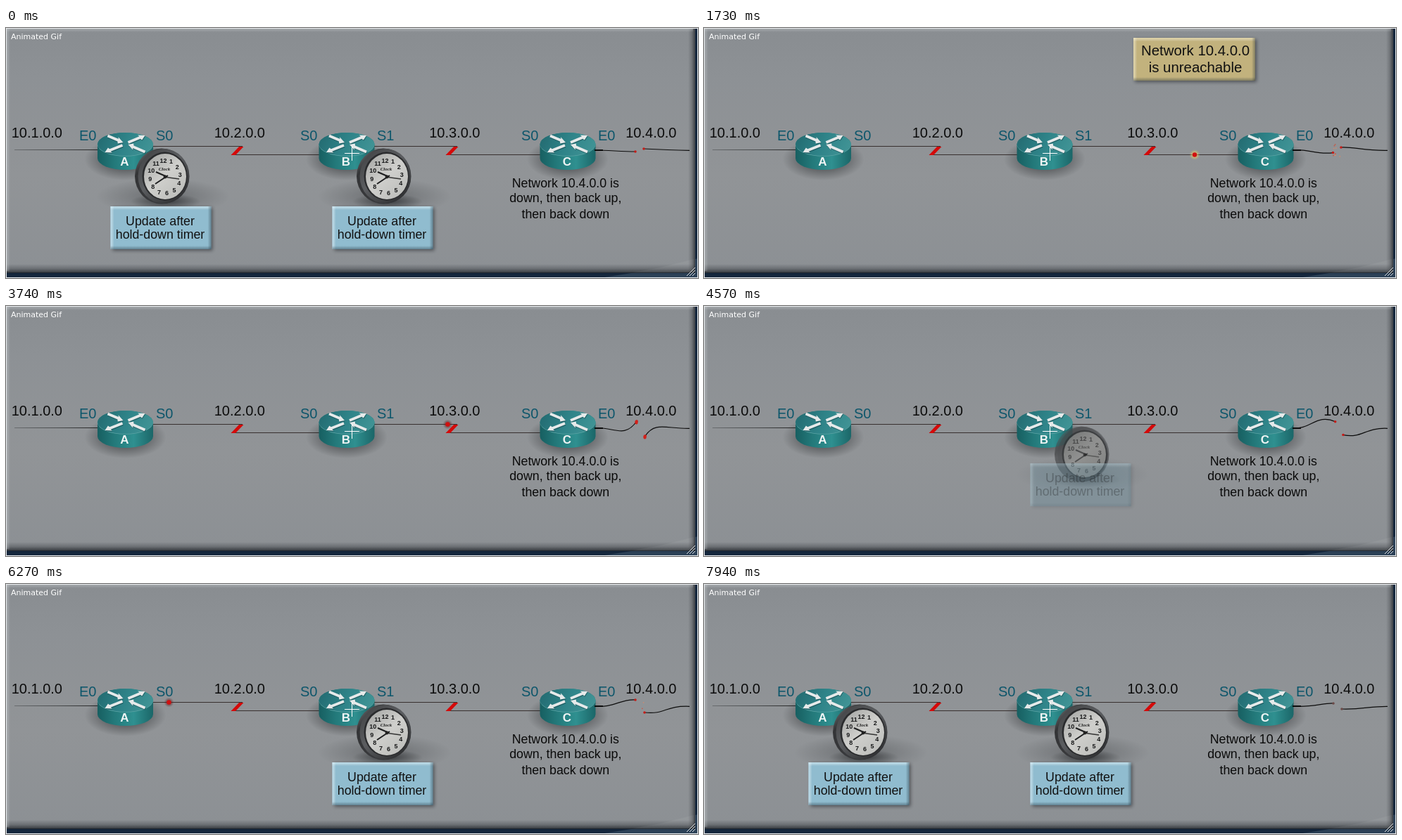
An HTML page with a canvas that plays this animation: 983 by 356 pixels, repeating every 8370 ms.

```html
<!DOCTYPE html>
<html lang="en">
<head>
<meta charset="utf-8">
<title>Hold-down timers</title>
<style>
html, body { margin: 0; width: 100%; height: 100%; overflow: hidden; background: #14253a; }
canvas { display: block; }
</style>
</head>
<body>
<canvas id="stage" width="983" height="356"></canvas>
<script>
const ctx = document.getElementById('stage').getContext('2d');
const W = 983, H = 356, LOOP = 8370;
const SANS = '"Liberation Sans", Arial, sans-serif';
const STEPS = [0, 70, 480, 890, 1310, 1730, 2150, 2540, 2940, 3350, 3740,
  4150, 4570, 5020, 5430, 5850, 6270, 6690, 7110, 7530, 7940];

// time, left wire (control, control, tip), right wire (tip, control, control)
const WIRES = [
  [0, 856, 174, 874, 176, 894, 176, 906, 172, 925, 173, 950, 174],
  [890, 856, 174, 874, 176, 894, 176, 906, 172, 925, 173, 950, 174],
  [2540, 856, 169, 870, 186, 893, 179, 904, 168, 921, 165, 928, 176],
  [3740, 862, 171, 878, 190, 896, 164, 908, 185, 922, 164, 938, 175],
  [5020, 862, 178, 868, 138, 897, 165, 908, 183, 941, 199, 938, 172],
  [6270, 862, 177, 875, 163, 894, 165, 907, 183, 938, 186, 935, 173],
  [7940, 865, 176, 880, 169, 894, 170, 906, 178, 935, 179, 945, 174],
  [LOOP, 856, 174, 874, 176, 894, 176, 906, 172, 925, 173, 950, 174]
];

const clamp = v => Math.max(0, Math.min(1, v));
const ramp = (t, from, to) => clamp((t - from) / (to - from));
const hash = n => { const s = Math.sin(n * 127.1 + 3.7) * 43758.5453; return s - Math.floor(s); };

function gradient(x0, y0, x1, y1, ...stops) {
  const g = ctx.createLinearGradient(x0, y0, x1, y1);
  stops.forEach(([p, c]) => g.addColorStop(p, c));
  return g;
}

function glow(x, y, r, inner, outer) {
  const g = ctx.createRadialGradient(x, y, 0, x, y, r);
  g.addColorStop(0, inner);
  g.addColorStop(1, outer);
  ctx.fillStyle = g;
  ctx.fillRect(x - r, y - r, 2 * r, 2 * r);
}

function shadow(x, y, rx, ry, alpha) {
  ctx.save();
  ctx.translate(x, y);
  ctx.scale(1, ry / rx);
  glow(0, 0, rx, `rgba(20,22,24,${alpha})`, 'rgba(20,22,24,0)');
  ctx.restore();
}

function text(str, x, y, size, color, align = 'left', style = '', family = SANS) {
  ctx.font = `${style} ${size}px ${family}`;
  ctx.textAlign = align;
  ctx.fillStyle = color;
  ctx.fillText(str, x, y);
}

function line(x0, y0, x1, y1, color, width = 1) {
  ctx.strokeStyle = color;
  ctx.lineWidth = width;
  ctx.beginPath();
  ctx.moveTo(x0, y0);
  ctx.lineTo(x1, y1);
  ctx.stroke();
}

function poly(points, color) {
  ctx.fillStyle = color;
  ctx.beginPath();
  points.forEach(([x, y]) => ctx.lineTo(x, y));
  ctx.closePath();
  ctx.fill();
}

function oval(x, y, rx, ry, fill) {
  ctx.fillStyle = fill;
  ctx.beginPath();
  ctx.ellipse(x, y, rx, ry, 0, 0, 7);
  ctx.fill();
}

function background() {
  ctx.fillStyle = '#14263c';
  ctx.fillRect(0, 0, W, H);
  poly([[850, 355], [920, 344], [983, 328], [983, 355]], '#2b4056');
  ctx.fillStyle = gradient(0, 0, 0, 348, [0, '#898d91'], [0.2, '#8d9195'], [0.6, '#919497'], [1, '#8c9094']);
  ctx.fillRect(0, 0, 979, 348);
  ctx.fillStyle = gradient(0, 336, 0, 349, [0, 'rgba(35,39,44,0)'], [0.5, 'rgba(35,39,44,.3)'], [1, 'rgba(35,39,44,.85)']);
  ctx.fillRect(0, 336, 979, 13);
  ctx.fillStyle = gradient(969, 0, 979, 0, [0, 'rgba(35,39,44,0)'], [0.5, 'rgba(35,39,44,.25)'], [1, 'rgba(35,39,44,.75)']);
  ctx.fillRect(969, 0, 10, 349);
  ctx.fillStyle = gradient(0, 0, 0, 6, [0, 'rgba(215,220,223,.4)'], [1, 'rgba(215,220,223,0)']);
  ctx.fillRect(0, 0, 976, 6);
  ctx.fillStyle = gradient(0, 0, 6, 0, [0, 'rgba(215,220,223,.4)'], [1, 'rgba(215,220,223,0)']);
  ctx.fillRect(0, 0, 6, 346);
  poly([[890, 348], [930, 341], [977, 329], [977, 348]], 'rgba(255,255,255,.05)');
  ctx.strokeStyle = '#e6e9eb';
  ctx.lineWidth = 1;
  ctx.strokeRect(0.5, 0.5, W - 1, H - 1);
  for (const d of [4, 8, 12]) line(979 - d, 353, 979, 353 - d, '#dfe3e6');
  text('Animated Gif', 7, 16, 11, '#fff', 'left', '', '"DejaVu Sans", Verdana, sans-serif');
}

function links() {
  const upper = 168.5, lower = 180.5, color = '#38302f';
  line(12, 173.5, 131, 173.5, gradient(12, 0, 131, 0, [0, 'rgba(50,52,54,.4)'], [0.5, '#4a4c4e'], [1, '#222']));
  for (const [x0, x1, zig] of [[207, 447, 0], [521, 761, 305]]) {
    line(x0, upper, 336 + zig, upper, color);
    line(320 + zig, lower, x1, lower, color);
    poly([[331 + zig, 169], [337.5 + zig, 169], [326 + zig, 181], [319.5 + zig, 181]], '#d40a0a');
  }
}

function arrow(x, y, dx, dy, color) {
  const len = Math.hypot(dx, dy), ux = dx / len, uy = dy / len;
  const at = (along, side) => [x + ux * along - uy * side, y + uy * along + ux * side];
  poly([at(0, -1.9), at(len - 8, -1.9), at(len - 9.5, -4.4), at(len, 0),
    at(len - 6.5, 4.4), at(len - 8, 1.9), at(0, 1.9)], color);
}

function router(x, name) {
  const top = 165.5, foot = 185.5, rx = 39.5, ry = 16.5;
  shadow(x, 187, 58, 30, 0.75);
  ctx.fillStyle = gradient(x - rx, 0, x + rx, 0, [0, '#175f61'], [0.3, '#23797a'], [0.65, '#2f9090'], [1, '#1b6668']);
  ctx.beginPath();
  ctx.ellipse(x, top, rx, ry, 0, Math.PI, 0);
  ctx.ellipse(x, foot, rx, ry, 0, 0, Math.PI);
  ctx.closePath();
  ctx.fill();
  oval(x, top + 0.8, rx, ry, '#5ba3a4');
  oval(x, top, rx, ry, gradient(x - 30, top - 14, x + 30, top + 14, [0, '#256f75'], [0.5, '#2f8489'], [1, '#3f9294']));
  for (const [ax, ay, dx, dy] of [[-25, -12, 22, 9.5], [4, -2.5, 24, -10], [-4, 1.5, -25, 10], [28, 11, -24, -10.5]]) {
    arrow(x + ax + 0.6, top + ay + 1.2, dx, dy, 'rgba(15,60,65,.5)');
    arrow(x + ax, top + ay, dx, dy, '#e6eaea');
  }
  text(name, x - 1, 196, 17, '#eef4f4', 'center', 'bold');
}

function bevelBox(x, y, w, h, color, light) {
  ctx.save();
  ctx.shadowColor = 'rgba(25,28,32,.55)';
  ctx.shadowBlur = 5;
  ctx.shadowOffsetX = ctx.shadowOffsetY = 2;
  ctx.fillStyle = color;
  ctx.fillRect(x, y, w, h);
  ctx.restore();
  const dark = 'rgba(30,45,55,.4)', none = 'rgba(30,45,55,0)', fade = 'rgba(255,255,255,0)';
  const edge = (ex, ey, ew, eh, g) => { ctx.fillStyle = g; ctx.fillRect(ex, ey, ew, eh); };
  edge(x, y, w, 5, gradient(0, y, 0, y + 5, [0, light], [1, fade]));
  edge(x, y, 5, h, gradient(x, 0, x + 5, 0, [0, light], [1, fade]));
  edge(x, y + h - 5, w, 5, gradient(0, y + h - 5, 0, y + h, [0, none], [1, dark]));
  edge(x + w - 5, y, 5, h, gradient(x + w - 5, 0, x + w, 0, [0, none], [1, dark]));
}

function clock(x) {
  const y = 211, tilt = -0.12;
  shadow(x, 240, 95, 26, 0.3);
  shadow(x + 4, 247, 50, 11, 0.6);
  oval(x - 2, y, 38, 39.5, gradient(x - 38, y - 30, x + 30, y + 36, [0, '#6b6d70'], [0.2, '#333436'], [0.7, '#3a3b3e'], [1, '#1d1e20']));
  oval(x + 1, y, 36.5, 39, gradient(x - 30, y - 34, x + 30, y + 34, [0, '#434446'], [0.45, '#5b5d60'], [1, '#2a2b2d']));
  oval(x + 2.5, y, 32, 34.5, '#2a2b2d');
  oval(x + 3, y + 0.5, 30, 32.5, gradient(x - 24, y - 28, x + 26, y + 28, [0, '#a6a7a5'], [0.5, '#cfcfcc'], [1, '#bdbebb']));
  const cx = x + 3;
  for (let n = 1; n <= 12; n++) {
    const a = n * Math.PI / 6 + tilt;
    text(n, cx + 21.5 * Math.sin(a), y + 4 - 23.5 * Math.cos(a), 9, '#18191a', 'center', 'bold');
  }
  text('Clock', cx - 1, y - 8, 7, '#222', 'center', 'italic bold', '"Liberation Serif", serif');
  line(cx + 3, y + 1, cx - 13, y - 6, '#1d1e1f', 2);
  line(cx + 4, y - 1, cx - 14, y + 11, '#1d1e1f', 2);
  line(cx - 2, y + 1, cx + 20, y + 4, '#333', 1.4);
  oval(cx, y + 1, 2.4, 2.4, '#222');
}

// since: time elapsed after the update reached this router
function timer(x, since) {
  if (since <= 0) return;
  ctx.globalAlpha = ramp(since, 100, 480);
  clock(x);
  const drop = -45 * Math.pow(1 - ramp(since, 200, 1100), 3);
  ctx.globalAlpha = ramp(since, 200, 600);
  const y = 254 + drop;
  bevelBox(x - 74.5, y, 143, 61, '#90bccf', 'rgba(215,240,250,.65)');
  text('Update after', x - 4, y + 27, 17.8, '#111', 'center');
  text('hold-down timer', x - 4, y + 46, 17.8, '#111', 'center');
  ctx.globalAlpha = 1;
}

function notice(t) {
  ctx.globalAlpha = ramp(t, 1000, 1600) * (1 - ramp(t, 2700, 3300));
  if (ctx.globalAlpha) {
    bevelBox(610, 14, 173, 61, '#c2b27d', 'rgba(240,230,190,.65)');
    text('Network 10.4.0.0', 698, 39, 20.4, '#111', 'center');
    text('is unreachable', 698, 63, 20.4, '#111', 'center');
  }
  ctx.globalAlpha = 1;
}

function along(points, dist) {
  for (let i = 1; i < points.length; i++) {
    const [x0, y0] = points[i - 1], [x1, y1] = points[i];
    const len = Math.hypot(x1 - x0, y1 - y0);
    if (dist <= len) return [x0 + (x1 - x0) * dist / len, y0 + (y1 - y0) * dist / len];
    dist -= len;
  }
  return null;
}

function packet(t) {
  const speed = 0.2;
  let pos = null, held = false;
  if (t > 625 && t < 4400) {
    const early = (t - 625) * speed;
    held = early > 62 && t < 3230;
    const dist = t < 3230 ? Math.min(62, early) : 62 + (t - 3230) * speed;
    pos = along([[759, 180.5], [627, 180.5], [641, 168.5], [524, 168.5]], dist);
  } else if (t > 5040) {
    pos = along([[445, 180.5], [321, 180.5], [335, 168.5], [209, 168.5]], (t - 5040) * speed);
  }
  if (!pos) return;
  const [x, y] = pos;
  if (held) glow(x, y, 7.5, 'rgba(255,225,110,1)', 'rgba(235,200,90,0)');
  else glow(x, y, 7, 'rgba(110,10,10,.9)', 'rgba(90,30,30,0)');
  oval(x, y, 3.2, 3.2, '#d01010');
}

function wires(t) {
  const i = WIRES.findIndex(k => k[0] > t);
  const a = WIRES[i - 1], b = WIRES[i];
  const p = ramp(t, a[0], b[0]), s = p * p * (3 - 2 * p);
  const w = a.map((v, k) => v + (b[k] - v) * s);
  ctx.strokeStyle = '#0c0c0c';
  ctx.lineWidth = 1.2;
  ctx.beginPath();
  ctx.moveTo(836, 174);
  ctx.bezierCurveTo(...w.slice(1, 7));
  ctx.moveTo(w[7], w[8]);
  ctx.bezierCurveTo(...w.slice(9, 13), 971, 174.3);
  ctx.stroke();
  line(836, 174, 848, 174, '#0c0c0c', 2);

  const lit = t > 800 && t < 1200, faded = t > 7300;
  for (const [x, y] of [[w[5], w[6]], [w[7], w[8]]]) {
    if (lit) oval(x, y, 3, 3, '#e9dcda');
    oval(x, y, 1.8, 1.8, faded ? '#6b4a48' : '#c41c18');
    if (t > 3400 && t < 4000) oval(x - 0.5, y + 1.5, 2.2, 3, '#d2201a');
  }
  const count = t > 800 && t < 3400 ? 9 : t > 5400 && t < 7000 ? 2 : 0;
  for (let n = 0; n < count; n++) {
    const seed = n + t * 0.013;
    ctx.globalAlpha = lit ? 0.4 : 0.75;
    oval(893 + 13 * hash(seed), 164 + 19 * hash(seed + 50), 0.9, 0.9, n % 2 ? '#d8472c' : '#e08a66');
  }
  ctx.globalAlpha = 1;
}

function labels() {
  [[7, 1], [295, 2], [600.5, 3], [879.5, 4]].forEach(([x, n]) => text(`10.${n}.0.0`, x + 0.7, 156, 20, '#0b0b0b'));
  [['E0', 104], ['S0', 213], ['S0', 418], ['S1', 527], ['S0', 732], ['E0', 841]]
    .forEach(([s, x]) => text(s, x, 160, 20, '#0d566b'));
  [['Network 10.4.0.0 is', 227], ['down, then back up,', 248], ['then back down', 271]]
    .forEach(([s, y]) => text(s, 794.8, y, 17.8, '#0b0b0b', 'center'));
}

function draw(t) {
  background();
  links();
  packet(t);
  router(169.5, 'A');
  router(484, 'B');
  router(798, 'C');
  wires(t);
  labels();
  const tail = t < 70 ? LOOP : 0;
  timer(223, t + tail - 6365);
  timer(538, t + tail - 4255);
  notice(t);
  line(481, 178.5, 502, 178.5, '#fff');
  line(491.5, 168, 491.5, 189, '#fff');
}

const start = performance.now();
let shown = -1;
function tick() {
  const now = (performance.now() - start) % LOOP;
  const t = STEPS.filter(s => s <= now).pop();
  if (t !== shown) draw(shown = t);
  requestAnimationFrame(tick);
}
tick();
</script>
</body>
</html>
```
